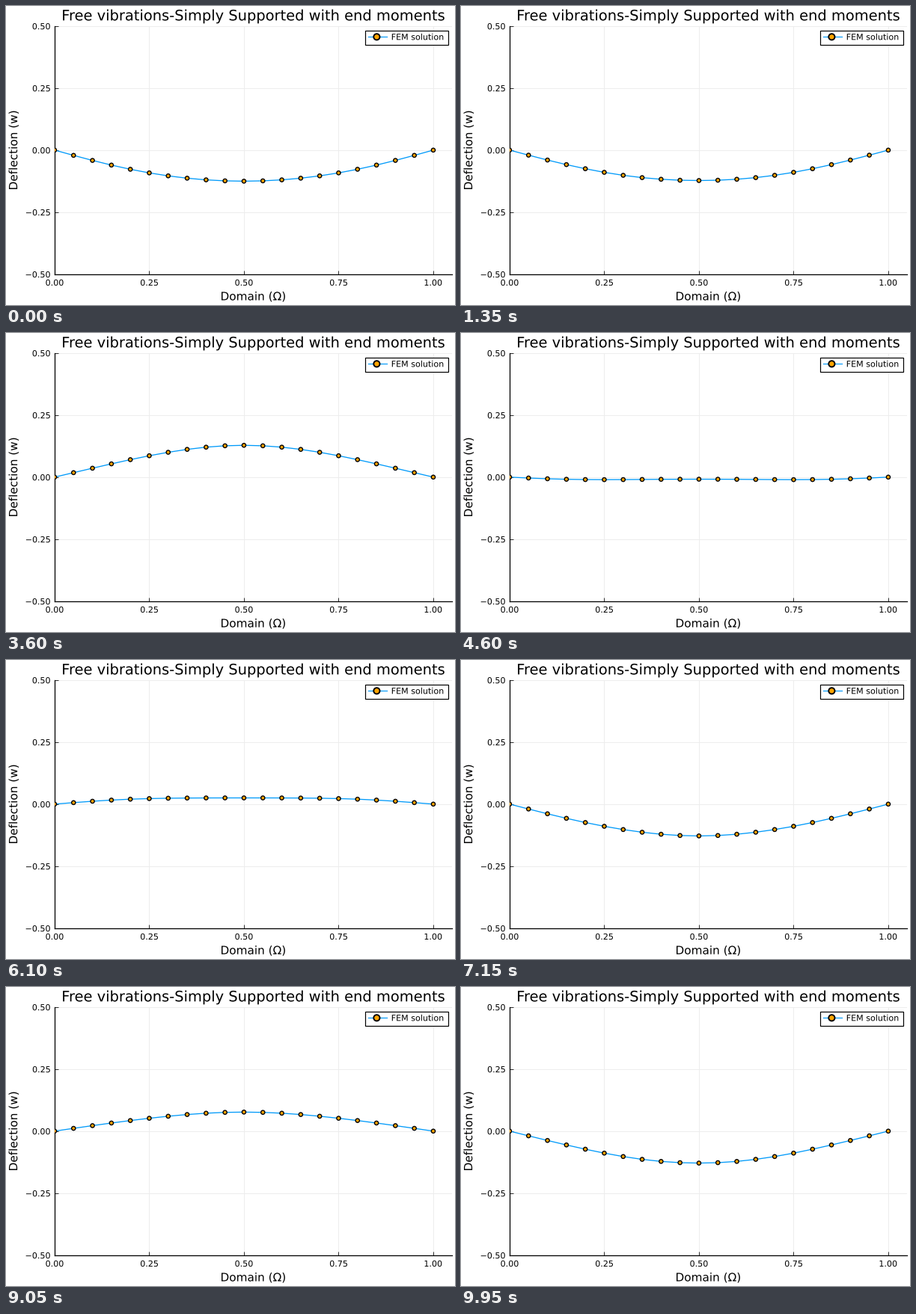
Write a matplotlib script that moves like this. It is 600 px wide and 400 px high and loops after 10000 ms.

```python
import numpy as np
import matplotlib.pyplot as plt
from matplotlib.animation import FuncAnimation
from matplotlib.patches import Circle, PathPatch, Rectangle
from matplotlib.textpath import TextPath
from matplotlib.transforms import Affine2D

W, H = 600, 400
FRAMES, INTERVAL = 200, 50
PX = 0.72  # points per pixel at 100 dpi
LEFT, RIGHT, TOP, BOTTOM = 64.95, 595.95, 26.8, 358.8
MID_X, MID_Y = (LEFT + RIGHT) / 2, (TOP + BOTTOM) / 2
UNIT = 506  # pixels per unit of x
BLUE, ORANGE = "#009afa", "#ffa500"

plt.rcParams.update({"font.family": "DejaVu Sans", "toolbar": "None"})

# Simply supported beam, bent by unit end moments and then released.
# Each mode follows the average acceleration rule, starting from zero acceleration.
x = np.linspace(0, 1, 21)
n = np.arange(1, 20, 2)
step = 0.1
omega = (n * np.pi) ** 2 / np.sqrt(20)
half = np.arctan(omega * step / 2)
amp = 4 / (n * np.pi) ** 3 * np.cos(half)
shapes = np.sin(np.pi * np.outer(x, n))


def deflection(i):
    return -shapes @ (amp * np.cos((2 * i + 1) * half))


fig = plt.figure(figsize=(W / 100, H / 100), dpi=100, facecolor="white")


def label(px, py, text, size, anchor=0.5, angle=0):
    """Outline text on a baseline; anchor runs from 0 (left) to 1 (right)."""
    path = TextPath((0, 0), text, size=size / PX)
    box = path.get_extents()
    place = (Affine2D().translate(-box.x0 - anchor * box.width, 0)
             .rotate_deg(angle).translate(px, H - py))
    fig.add_artist(PathPatch(path, transform=place, facecolor="black",
                             linewidth=0, snap=False, zorder=8))


ax = fig.add_axes([LEFT / W, 1 - BOTTOM / H,
                   (RIGHT - LEFT) / W, (BOTTOM - TOP) / H])
ax.set_xlim(0, (RIGHT - LEFT) / UNIT)
ax.set_ylim(-0.5, 0.5)
x_ticks = np.linspace(0, 1, 5)
y_ticks = np.linspace(-0.5, 0.5, 5)
ax.set_xticks(x_ticks)
ax.set_yticks(y_ticks)
ax.tick_params(direction="in", length=5 * PX, width=0.8 * PX,
               labelbottom=False, labelleft=False)
ax.grid(color="0.92", linewidth=0.9 * PX)
ax.set_axisbelow(True)
for side in ("top", "right"):
    ax.spines[side].set_visible(False)
for side in ("left", "bottom"):
    ax.spines[side].set_linewidth(1.3 * PX)

for v in x_ticks:
    label(LEFT + v * UNIT, 374, f"{v:.2f}", 8)
for v in y_ticks:
    py = MID_Y - v * (BOTTOM - TOP)
    label(58.8, py + 4.4, f"{v:.2f}".replace("-", "\u2212"), 8, anchor=1)

label(MID_X + 0.5, 19.3, "Free vibrations-Simply Supported with end moments", 14)
label(MID_X, 393.6, "Domain (Ω)", 11)
label(15.1, MID_Y, "Deflection (w)", 11, angle=90)

line, = ax.plot(x, deflection(0), color=BLUE, linewidth=1.3 * PX, zorder=3)
# One colour per node keeps the markers at sub-pixel positions.
nodes = ax.scatter(x, deflection(0), s=(5.2 * PX) ** 2, linewidths=1.4 * PX,
                   facecolors=[ORANGE] * len(x), edgecolors="black", zorder=4)

# Legend
fig.add_artist(Rectangle((480 / W, 1 - 52 / H), 111 / W, 19 / H, facecolor="white",
                         edgecolor="black", linewidth=1.2 * PX, zorder=5))
key_y = 41.3
fig.add_artist(plt.Line2D([484 / W, 508.5 / W], [1 - key_y / H] * 2, color=BLUE,
                          linewidth=1.2 * PX, zorder=6))
fig.add_artist(Circle((495.4, H - key_y), 4.1, transform=None, facecolor=ORANGE,
                      edgecolor="black", linewidth=1.9 * PX, zorder=7))
label(515.8, 45.3, "FEM solution", 8, anchor=0)


def draw(i):
    w = deflection(i)
    line.set_ydata(w)
    nodes.set_offsets(np.column_stack([x, w]))
    return line, nodes


anim = FuncAnimation(fig, draw, frames=FRAMES, interval=INTERVAL,
                     repeat=True, repeat_delay=0, blit=False)
plt.show()
```
